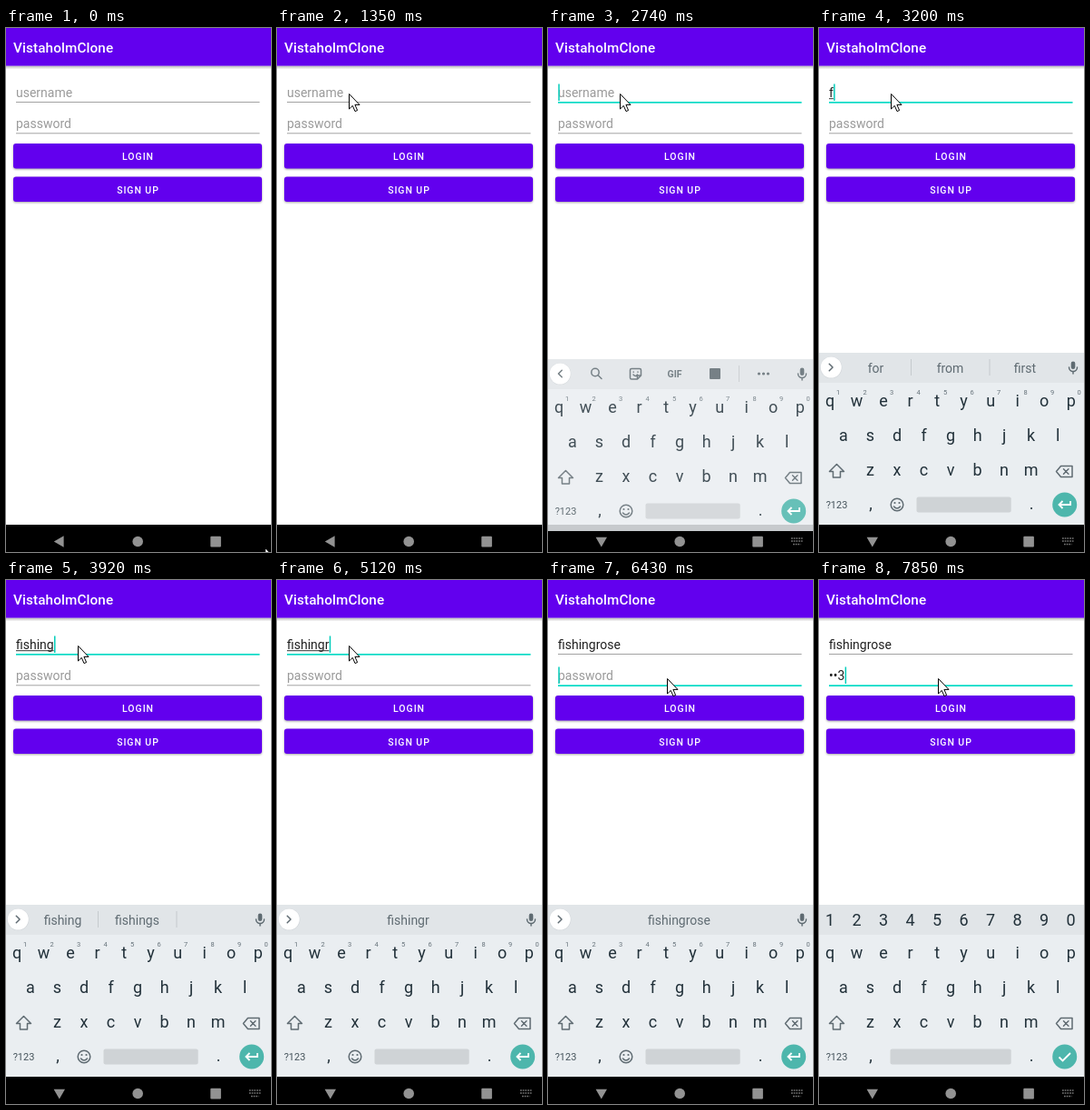
Animation of 292x576 px, one loop 8000 ms. Source, as an HTML page:

```html
<!DOCTYPE html>
<html lang="en">
<head>
<meta charset="utf-8">
<title>Login screen</title>
<style>
  html, body { margin: 0; width: 100%; height: 100%; overflow: hidden; background: #fff; }
  svg { display: block; width: 292px; height: 576px; font-family: Roboto, sans-serif; }
  text { white-space: pre; }
  .field { font-size: 14px; fill: #212121; }
  .hint { fill: #9a9a9a; }
  .btn rect { fill: #6200ee; filter: drop-shadow(0 1px 1px rgba(0, 0, 0, .35)); }
  .btn text { fill: #fff; font-size: 10.5px; font-weight: 500; letter-spacing: .93px; text-anchor: middle; }
  .key { font-size: 18px; fill: #22313a; text-anchor: middle; }
  .sup { font-size: 7.5px; fill: #66727a; text-anchor: middle; }
  .sug { font-size: 14px; fill: #5f6b72; text-anchor: middle; }
  .icon { fill: none; stroke: #5f6b72; stroke-width: 1.5; stroke-linejoin: round; stroke-linecap: round; }
  .solid { fill: #5f6b72; }
</style>
</head>
<body>
<svg viewBox="0 0 292 576">
  <defs>
    <linearGradient id="shade" x2="0" y2="1">
      <stop stop-color="#000" stop-opacity=".28"/>
      <stop offset="1" stop-color="#000" stop-opacity="0"/>
    </linearGradient>
  </defs>
  <rect width="292" height="576" fill="#fff"/>
  <rect y="41.5" width="292" height="4" fill="url(#shade)"/>
  <rect width="292" height="41.6" fill="#6200ee"/>
  <text x="8" y="26.5" font-size="15.3" font-weight="500" letter-spacing=".1" fill="#fff">VistaholmClone</text>

  <rect id="userLine" x="11"/>
  <rect id="passLine" x="11"/>
  <text id="user" class="field" x="11" y="76"></text>
  <rect id="compose" x="11" y="77.2" height="1" fill="#333"/>
  <text id="pass" class="field" x="11" y="110"></text>
  <rect id="caret" width="1.5" height="18.5" fill="#03cdbb"/>

  <g class="btn">
    <rect x="8" y="127" width="274" height="27.5" rx="3"/>
    <text x="145.5" y="145">LOGIN</text>
    <rect x="8" y="163.5" width="274" height="27.5" rx="3"/>
    <text x="145.5" y="181.5">SIGN UP</text>
  </g>

  <rect y="546" width="292" height="30" fill="#000"/>

  <g id="kb">
    <rect y="357" width="292" height="189" fill="#eaeef1"/>
    <rect y="357" width="292" height="33" fill="#e1e5e8"/>
    <g id="letters"></g>
    <g id="digits"></g>
    <g id="sups"></g>

    <g id="strip">
      <circle cx="13.3" cy="373.2" r="12" fill="#c8ccd0" opacity=".6"/>
      <circle cx="13.3" cy="373" r="11.5" fill="#fff"/>
      <path id="chevron" class="icon" d="M2 -3.7L-1.8 0L2 3.7"/>
      <rect class="solid" x="277.7" y="366.5" width="4.6" height="8.5" rx="2.3"/>
      <path class="icon" stroke-width="1.3" d="M275.5 373a4.5 4.5 0 0 0 9 0M280 377.5v2.5"/>
      <g id="tools">
        <g class="icon">
          <circle cx="52" cy="371.5" r="4.2"/>
          <path d="M55.2 374.7L59 378.5"/>
          <path d="M92 367.5h9q1.500 0 1.500 1.500v6l-4 4h-6.500q-1.500 0-1.500-1.500v-8.500q0-1.500 1.500-1.500zM102.500 375h-4v4M94 374q2.500 3 4.500 0M94.200 371v.2M99 371v.2"/>
        </g>
        <text class="solid" x="139.500" y="377" font-size="10.500" font-weight="700" text-anchor="middle">GIF</text>
        <rect class="solid" x="178" y="367" width="12" height="12" rx="1"/>
        <rect x="210" y="364" width="1" height="18" fill="#c5cacd"/>
        <g class="solid">
          <circle cx="232.500" cy="373" r="1.600"/>
          <circle cx="237.500" cy="373" r="1.600"/>
          <circle cx="242.500" cy="373" r="1.600"/>
        </g>
      </g>
      <g id="bars" fill="#c5cacd">
        <rect x="101" y="364" width="1" height="18"/>
        <rect x="187.500" y="364" width="1" height="18"/>
      </g>
      <text class="sug" x="62.500" y="379"></text>
      <text class="sug" x="144.500" y="379"></text>
      <text class="sug" x="227" y="379"></text>
    </g>

    <path class="icon" d="M19.500 479.500L11.500 487.500H15.500V494H23.500V487.500H27.500Z"/>
    <path class="icon" d="M266.500 481.500H279V493.500H266.500L261.500 487.500ZM269.500 484.800l5.400 5.400m0-5.400l-5.400 5.400"/>
    <text x="19.500" y="528" font-size="11" fill="#46545c" text-anchor="middle">?123</text>
    <text class="key" x="57" y="528.500">,</text>
    <text class="key" x="234" y="528.500">.</text>
    <g id="smile">
      <circle class="icon" cx="86" cy="524" r="6.800"/>
      <path class="icon" d="M82.500 526q3.500 4 7 0"/>
      <circle class="solid" cx="83.500" cy="522" r="1.100"/>
      <circle class="solid" cx="88.500" cy="522" r="1.100"/>
    </g>
    <rect id="space" y="515.500" height="17" rx="2" fill="#cfd3d6"/>
    <circle cx="270.700" cy="524" r="13.500" fill="#4db6ac"/>
    <path id="enter" fill="none" stroke="#fff" stroke-width="1.800"/>
  </g>

  <g fill="#929292">
    <path id="back" d="M-6 0L4.800 -6.200V6.200Z"/>
    <circle cx="145.200" cy="564.500" r="5.800"/>
    <rect x="225.300" y="558.800" width="11.600" height="11.600" rx="1"/>
    <path id="kbIcon" d="M268 561h12.500M268 564h12.500M270 567.500h8.500" stroke="#777" stroke-width="1.700" stroke-dasharray="1.700 1"/>
  </g>

  <circle id="click" r="15" fill="#ff0" opacity=".45"/>
  <path id="mouse" d="M.500 .500V17L4.300 13.400L7 19.600L9.600 18.500L6.900 12.400H12Z" fill="#fff" stroke="#000"/>
</svg>
<script>
const LOOP = 8000;
const TEAL = '#03dac5';
const $ = id => document.getElementById(id);
const show = (id, on) => { $(id).style.display = on ? '' : 'none'; };
const set = (el, attrs) => { for (const k in attrs) el.setAttribute(k, attrs[k]); };

function addText(parent, cls, x, y, str) {
  const el = document.createElementNS('http://www.w3.org/2000/svg', 'text');
  set(el, { class: cls, x, y });
  el.textContent = str;
  $(parent).append(el);
}

function addRow(parent, str, x, y, cls = 'key') {
  [...str].forEach((c, i) => addText(parent, cls, x + i * 29.52, y, c));
}

addRow('letters', 'qwertyuiop', 12, 415.500);
addRow('letters', 'asdfghjkl', 27, 453.500);
addRow('letters', 'zxcvbnm', 56.500, 492);
addRow('digits', '1234567890', 12, 380);
addRow('sups', '1234567890', 21, 403, 'sup');

// Value of the last entry that has begun; entries are [time, value].
const at = (list, t) => list.reduce((v, [start, next]) => t >= start ? next : v, list[0][1]);

const mouse = [
  [0, [285, 571]], [120, [272, 540]], [200, [232, 440]], [270, [178, 290]],
  [340, [122, 150]], [410, [72, 48]], [490, [43, 5]],
  [720, [27, 0]], [800, [20, 8]], [880, [38, 32]], [950, [66, 60]], [1030, [79, 72]],
  [5730, [92, 82]], [5800, [112, 95]], [5850, [122, 100]], [5890, [126, 103]],
  [5970, [129, 106]], [6050, [131, 108]]
];
const userText = [
  [0, ''], [3200, 'f'], [3280, 'fi'], [3370, 'fis'], [3520, 'fish'], [3600, 'fishi'],
  [3750, 'fishin'], [3850, 'fishing'], [5040, 'fishingr'], [5270, 'fishingro'],
  [5350, 'fishingros'], [5500, 'fishingrose']
];
const passText = [[0, ''], [7450, '1'], [7600, '•2'], [7850, '••3']];
const suggestions = [
  [0, []], [3200, ['for', 'from', 'first']], [3370, ['fish', 'fist', 'first']],
  [3520, ['fish', 'fishing', 'fisher']], [3600, ['fishing', 'fishin', 'fishings']],
  [3850, ['fishing', 'fishin', '']], [3920, ['fishing', 'fishings', '']],
  [4870, []], [5120, ['', 'fishingr']], [5350, ['', 'fishingros']], [5580, ['', 'fishingrose']]
];
const caretOn = [
  [0, 0], [1430, 1], [1960, 0], [2440, 1], [4400, 0], [5040, 1], [6090, 0],
  [6430, 1], [6820, 0], [7450, 1]
];
const slide = [[0, [40, 0]], [2670, [18, .45]], [2740, [7, .85]], [2840, [2, .95]], [2890, [0, 1]]];
const backTurn = [[0, 0], [1960, -25], [2050, -50], [2130, -75], [2440, -90]];

function field(id, str, hint) {
  $(id).textContent = str || hint;
  $(id).classList.toggle('hint', !str);
  return str ? $(id).getComputedTextLength() : 0;
}

function underline(id, y, focused) {
  set($(id), { y, width: 268.500, height: focused ? 1.700 : 1, fill: focused ? TEAL : '#a3a3a3' });
}

function draw(t) {
  const inPass = t >= 6430;
  const inUser = t >= 1430 && !inPass;
  const secret = t >= 6740;

  const userWidth = field('user', at(userText, t), 'username');
  const passWidth = field('pass', at(passText, t), 'password');
  underline('userLine', 81, inUser);
  underline('passLine', 115.300, inPass);
  set($('compose'), { width: inUser ? userWidth : 0 });
  set($('caret'), { x: 11.300 + (inPass ? passWidth : userWidth), y: inPass ? 95.500 : 61.500 });
  show('caret', at(caretOn, t));

  const [dy, alpha] = at(slide, t);
  set($('kb'), { transform: `translate(0 ${dy})`, opacity: alpha });
  show('kb', alpha > 0);
  show('strip', !secret);
  show('sups', !secret);
  show('smile', !secret);
  show('digits', secret);
  show('tools', t < 3050);
  show('bars', t >= 3200 && t < 4870);
  set($('chevron'), { transform: `translate(13.300 373) scale(${t < 3050 ? 1 : -1} 1)` });
  const words = at(suggestions, t);
  document.querySelectorAll('.sug').forEach((el, i) => { el.textContent = words[i] || ''; });
  const left = secret ? 78.500 : 107.500;
  set($('space'), { x: left, width: 211.700 - left });
  set($('enter'), { d: secret ? 'M264.500 524.500l4 4l8.500-8.500' : 'M277 520v4h-12M268.500 520l-4 4l4 4' });

  set($('back'), { transform: `translate(58.800 564.500) rotate(${at(backTurn, t)})` });
  show('kbIcon', t >= 2130);

  const [mx, my] = at(mouse, t);
  set($('mouse'), { transform: `translate(${mx} ${my})` });
  set($('click'), { cx: mx, cy: my + 1 });
  show('click', (t >= 1180 && t < 1350) || (t >= 6200 && t < 6350));
}

const start = performance.now();
function tick() {
  draw((performance.now() - start) % LOOP);
  requestAnimationFrame(tick);
}
tick();
</script>
</body>
</html>
```
